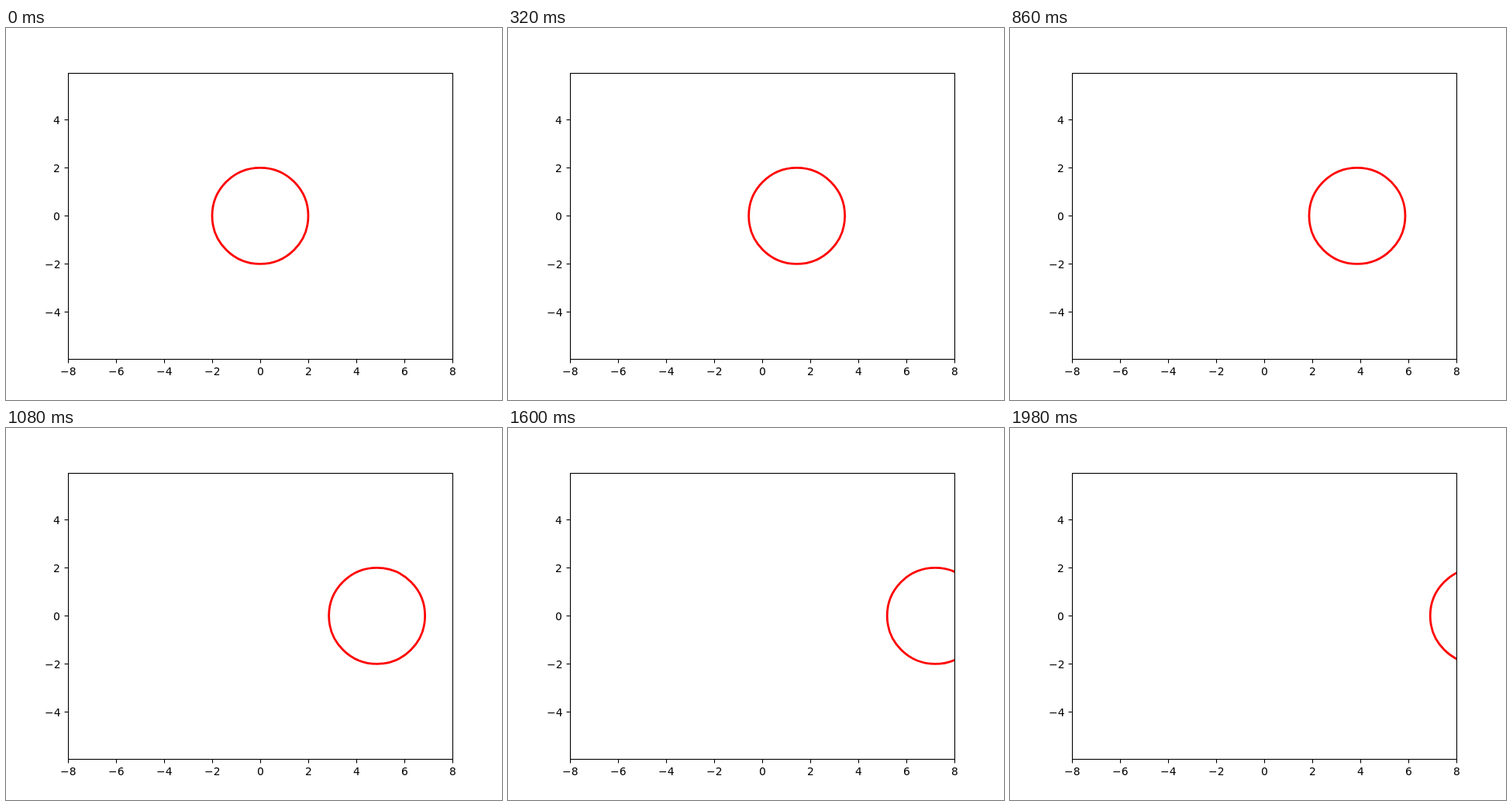
These frames come from a looping animation (640x480 px, 2 s). An HTML page:

```html
<!DOCTYPE html>
<html lang="en">
<head>
<meta charset="utf-8">
<title>Moving circle</title>
<style>
  html, body { margin: 0; width: 100%; height: 100%; overflow: hidden; background: #fff; }
  svg { display: block; }
  text { font: 13.889px "DejaVu Sans", sans-serif; }
</style>
</head>
<body>
<svg id="stage" width="640" height="480" viewBox="0 0 640 480">
  <defs><clipPath id="plot"><rect x="80" y="58" width="496" height="369"/></clipPath></defs>
  <g clip-path="url(#plot)">
    <circle id="ring" cy="242.4" r="62" fill="none" stroke="#f00" stroke-width="2.78"/>
  </g>
  <g id="axes" stroke="#000" stroke-width="1.11" fill="none">
    <rect x="80.5" y="58.5" width="496" height="369"/>
  </g>
  <g id="labels"></g>
</svg>
<script>
const UNIT = 31, ORIGIN_X = 328, ORIGIN_Y = 242.4;
const STEP_MS = 20, LOOP_MS = 2000, SPEED = 0.09;
const DIGIT_WIDTH = 8.84, MINUS_WIDTH = 11.64;
const $ = id => document.getElementById(id);

function add(parent, tag, attrs, content = "") {
  const node = document.createElementNS("http://www.w3.org/2000/svg", tag);
  for (const key in attrs) node.setAttribute(key, attrs[key]);
  node.textContent = content;
  $(parent).append(node);
}

const labelWidth = value => DIGIT_WIDTH + (value < 0 ? MINUS_WIDTH : 0);
const labelText = value => String(value).replace("-", "\u2212");

for (let value = -8; value <= 8; value += 2) {
  const x = ORIGIN_X + value * UNIT;
  add("axes", "path", { d: `M${x + 0.5} 427.5v5` });
  add("labels", "text", { x: Math.round(x - labelWidth(value) / 2), y: 448 }, labelText(value));
}

for (let value = -4; value <= 4; value += 2) {
  const y = Math.floor(ORIGIN_Y - value * UNIT);
  add("axes", "path", { d: `M75.5 ${y + 0.5}h5` });
  add("labels", "text", { x: Math.round(70.28 - labelWidth(value)), y: y + 6 }, labelText(value));
}

function render(ms) {
  const step = Math.floor((ms % LOOP_MS) / STEP_MS);
  $("ring").setAttribute("cx", ORIGIN_X + step * SPEED * UNIT);
}

const start = performance.now();
function tick(now) {
  render(Math.max(0, now - start));
  requestAnimationFrame(tick);
}
render(0);
requestAnimationFrame(tick);
</script>
</body>
</html>
```
